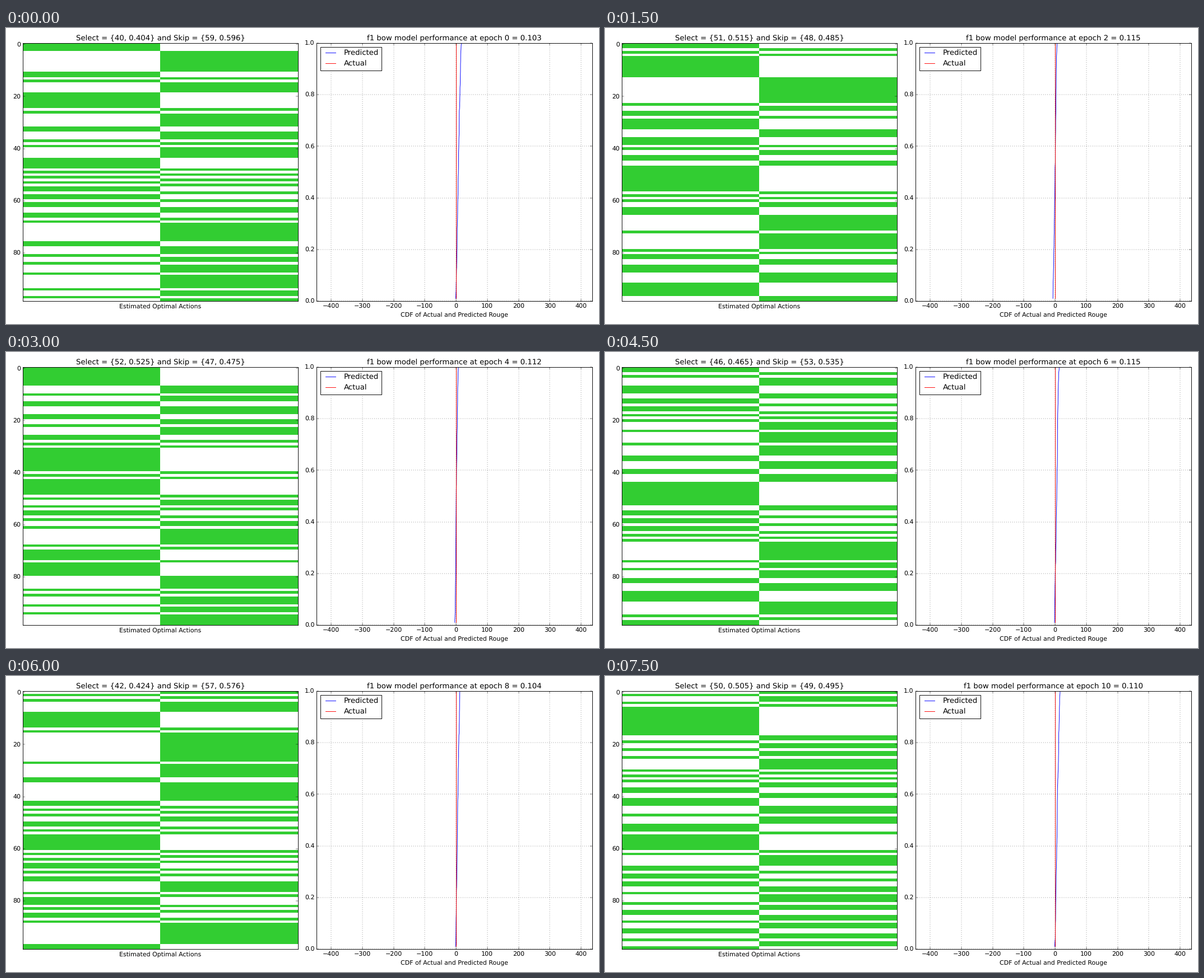
Animation of 1058 by 529 pixels, one loop 8 s. Source, as a matplotlib script:

```python
import numpy as np
import matplotlib.pyplot as plt
from matplotlib.animation import FuncAnimation
from matplotlib.colors import ListedColormap

plt.style.use("classic")
plt.rcParams.update({
    "figure.facecolor": "white",
    "savefig.dpi": "figure",
    "font.family": "DejaVu Sans",
    "text.hinting": "none",
    "axes.titley": 1.0,
})

W, H = 1058, 529
ROWS = 99
TICK_MS, EPOCH_MS, LOOP_MS = 250, 750, 8000

# Per epoch: score, selected rows, predicted range, and the longest run
# as first row and length (negative for "skip").
EPOCHS = [
    (0.103, 40, (-1.5, 17), (3, -8)),
    (0.109, 47, (-447, 436), (60, -6)),
    (0.115, 51, (-7, 6), (5, 8)),
    (0.110, 53, (-4, 8), (20, 6)),
    (0.112, 52, (-4, 7), (75, 5)),
    (0.105, 49, (-3, 11), (50, -6)),
    (0.115, 46, (-2, 13), (44, 9)),
    (0.097, 45, (-3, 10.5), (25, -7)),
    (0.104, 42, (-2, 12), (35, -7)),
    (0.109, 39, (-2, 14), (72, -5)),
    (0.110, 50, (-1, 16), (6, 11)),
]
LEVELS = np.arange(1, ROWS + 1) / ROWS


def choices(epoch):
    """Select and skip columns: one long run inside a seeded shuffle."""
    _, selected, _, (start, size) = EPOCHS[epoch]
    end = start + abs(size)
    rows = np.full(ROWS, -1)
    rows[start - 1:end + 1] = size < 0
    rows[start:end] = size > 0
    free = np.flatnonzero(rows < 0)
    fill = np.arange(free.size) < selected - np.sum(rows == 1)
    rows[free] = np.random.default_rng(epoch).permutation(fill)
    return np.column_stack([rows, 1 - rows])


def predictions(epoch):
    """Sorted, slightly low-skewed samples stretched over the range."""
    low, high = EPOCHS[epoch][2]
    x = np.sort(np.random.default_rng(epoch).beta(1.7, 2, ROWS))
    return low + (high - low) * (x - x[0]) / (x[-1] - x[0])


def add_axes(left, right, top=27, bottom=488):
    return fig.add_axes([left / W, 1 - bottom / H,
                         (right - left) / W, (bottom - top) / H])


fig = plt.figure(figsize=(16, 8), dpi=W / 16)

ax_act = add_axes(30, 521)
image = ax_act.imshow(choices(0), cmap=ListedColormap(["white", "limegreen"]),
                      vmin=0, vmax=1, aspect="auto", interpolation="nearest")
ax_act.set_xticks([])
ax_act.set_yticks(range(0, ROWS, 20))
ax_act.set_xlabel("Estimated Optimal Actions")

ax_cdf = add_axes(554, 1046)
predicted, = ax_cdf.plot([], [], "b", label="Predicted")
ax_cdf.plot([0, 0], [LEVELS[0], 1], "r", label="Actual")
ax_cdf.set_xlim(-447, 436)
ax_cdf.set_ylim(0, 1)
ax_cdf.set_xticks(range(-400, 401, 100))
ax_cdf.grid(True)
ax_cdf.set_xlabel("CDF of Actual and Predicted Rouge")
ax_cdf.legend(loc="upper left")


def update(i):
    epoch = i * TICK_MS // EPOCH_MS
    score, selected = EPOCHS[epoch][:2]
    skipped = ROWS - selected
    image.set_data(choices(epoch))
    predicted.set_data(predictions(epoch), LEVELS)
    ax_act.set_title(f"Select = {{{selected}, {selected / ROWS:.3f}}} and "
                     f"Skip = {{{skipped}, {skipped / ROWS:.3f}}}")
    ax_cdf.set_title(f"f1 bow model performance at epoch {epoch} = "
                     f"{score:.3f}")
    return image, predicted


anim = FuncAnimation(fig, update, frames=LOOP_MS // TICK_MS,
                     interval=TICK_MS, repeat=True, repeat_delay=0)
plt.show()
```
